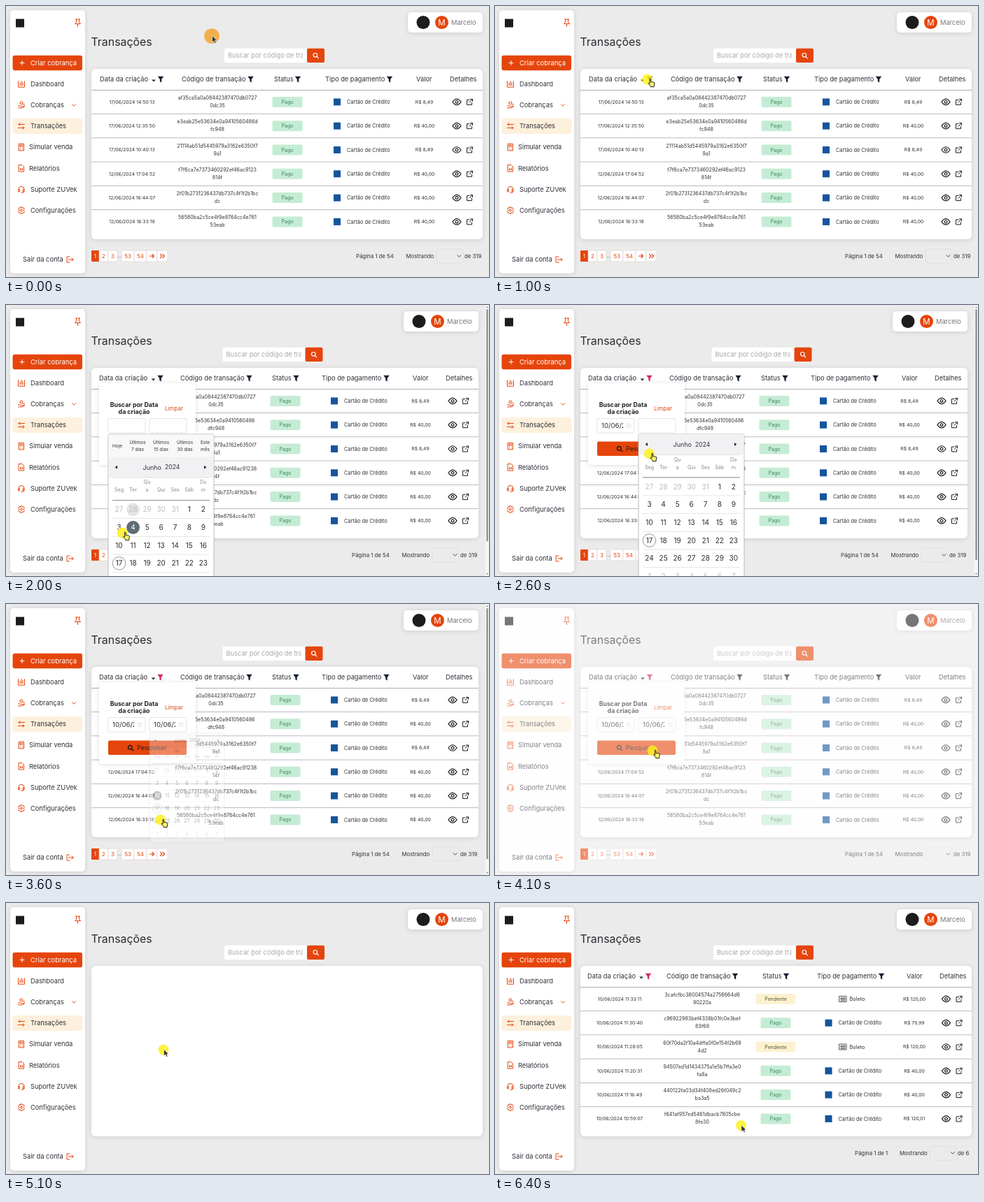
Animation, 690 px wide and 388 px high, one loop 7100 ms. Source, as an HTML page:

```html
<!DOCTYPE html>
<html lang="pt-BR">
<head>
<meta charset="utf-8">
<title>Transações</title>
<style>
html, body { margin: 0; width: 100%; height: 100%; overflow: hidden; background: #ebebeb; }
#stage { display: block; width: 100vw; height: 100vh; }
text { font-family: Inter, "Open Sans", sans-serif; white-space: pre; }
.soft { filter: drop-shadow(0 1px 3px rgba(0, 0, 0, .13)); }
.line { fill: none; stroke-linecap: round; stroke-linejoin: round; }
</style>
</head>
<body>
<svg id="stage" viewBox="0 0 690 388"></svg>
<script>
const ORANGE = '#e5450c', INK = '#30303a', NAVY = '#142030', PINK = '#d32a63';
const LOOP = 7100, STEP = 100;

// drawing helpers
const text = (x, y, s, size, fill = INK, anchor = 'start', weight = 400) =>
  `<text x="${x}" y="${y + size * .36}" font-size="${size}" fill="${fill}" text-anchor="${anchor}" font-weight="${weight}">${s}</text>`;
const mid = (x, y, s, size, fill, weight) => text(x, y, s, size, fill, 'middle', weight);
const rect = (x, y, w, h, fill, r = 0, more = '') =>
  `<rect x="${x}" y="${y}" width="${w}" height="${h}" rx="${r}" fill="${fill}" ${more}/>`;
const circle = (x, y, r, fill, more = '') => `<circle cx="${x}" cy="${y}" r="${r}" fill="${fill}" ${more}/>`;
const line = (x, y, d, color = ORANGE, w = 1) =>
  `<path class="line" transform="translate(${x} ${y})" d="${d}" stroke="${color}" stroke-width="${w}"/>`;
const solid = (x, y, d, fill, more = '') => `<path transform="translate(${x} ${y})" d="${d}" fill="${fill}" ${more}/>`;
const group = (id, body, more = '') => `<g id="${id}" ${more}>${body}</g>`;
const clip = (x, y, w, h, body) => `<svg x="${x}" y="${y}" width="${w}" height="${h}" viewBox="${x} ${y} ${w} ${h}">${body}</svg>`;

const ICON = {
  plus: 'M-3 0H3M0-3V3',
  chart: 'M-4.5-4V4.5H4.5V-4M-2 2V-1M0 2V-4M2 2V-2',
  hand: 'M-4.5 1H-2L0 2H3L4.5 1M-4.5 4H1L4.5 2M-2-3a2 2 0 1 0 4 0a2 2 0 1 0-4 0M2.5-1H4.5',
  swap: 'M4.5-2.5H-4L-2-4.5M-4-2.5L-2-.5M-4.5 2.5H4L2 .5M4 2.5L2 4.5',
  calc: 'M-3.5-4.8H3.5V4.8H-3.5ZM-1.8-3H1.8V-1H-1.8ZM-1.7 1H-1.6M1.6 1H1.7M-1.7 3H-1.6M1.6 3H1.7',
  file: 'M-3.5-4.8H1L3.5-2.2V4.8H-3.5ZM-1.5 2.5V0M0 2.5V1M1.5 2.5V0',
  phones: 'M-4 1V0a4 4 0 0 1 8 0V1M-4 .5H-2.5V3.5H-4ZM2.5 .5H4V3.5H2.5ZM4 3.5Q4 5 0 5',
  gear: 'M-1-4.7H1L1.6-3.2L3.2-3.8L4.4-2L3.4-.8V.8L4.4 2L3.2 3.8L1.6 3.2L1 4.7H-1L-1.6 3.2L-3.2 3.8L-4.4 2L-3.4 .8V-.8L-4.4-2L-3.2-3.8L-1.6-3.2ZM-1.4 0a1.4 1.4 0 1 0 2.8 0a1.4 1.4 0 1 0-2.8 0',
  exit: 'M0-4H-4V4H0M-1.5 0H5M3-2L5 0L3 2',
  pin: 'M-3-5H3M-2-5V-1L-4 1.5H4L2-1V-5M0 1.5V5.5',
  search: 'M-3.5-.7a2.8 2.8 0 1 0 5.6 0a2.8 2.8 0 1 0-5.6 0M1.5 1.5L3.8 3.8',
  eye: 'M-6 0Q0-8.5 6 0Q0 8.5-6 0ZM-1.9 0a1.9 1.9 0 1 0 3.8 0a1.9 1.9 0 1 0-3.8 0',
  open: 'M-.5-3H-4V4H3V.8M1-4H4V-1M4-4L-.5 .5',
  down: 'M-2.5-1.2L0 1.2L2.5-1.2',
  slip: 'M-5-4H5V4H-5ZM-3-2V1M-1.5-2V1M0-2V1M1.5-2V1M3-2V1M-3 2.5H3',
  funnel: 'M-4.2-4.2H4.2L1.2 0V4.4L-1.2 3V0Z',
  arrow: 'M-3 0H3M.5-2.5L3 0L.5 2.5',
  skip: 'M-3-2.5L-.5 0L-3 2.5M.5-2.5L3 0L.5 2.5',
  clock: 'M-3 0a3 3 0 1 0 6 0a3 3 0 1 0-6 0M0-1.5V0H1.2'
};

// sidebar
const MENU = [['chart', 'Dashboard', 35], ['hand', 'Cobranças', 35], ['swap', 'Transações', 35],
  ['calc', 'Simular venda', 33], ['file', 'Relatórios', 33], ['phones', 'Suporte ZUVek', 35], ['gear', 'Configurações', 35]];
const menu = rect(14, 18.5, 12, 12, '#1c1c1c') + line(102.5, 24, ICON.pin) +
  rect(9.5, 70.8, 99.5, 21.5, ORANGE, 3) + line(23, 81.5, ICON.plus, '#fff') + text(35, 81.5, 'Criar cobrança', 9.4, '#fff') +
  rect(9.5, 161, 99.5, 22, '#fdf0dc', 3) +
  MENU.map(([icon, label, x], i) => {
    const y = 111.7 + i * 30.15;
    return line(22, y, ICON[icon]) + text(x, y, label, 9.3);
  }).join('') +
  line(97, 142, ICON.down) + text(24, 363, 'Sair da conta', 9.3) + line(91, 363, ICON.exit);

const heading = text(121.5, 51.6, 'Transações', 15.9, '#2c2c33') + group('search',
  rect(312, 60.7, 119, 20.3, '#fff', 2) + clip(317, 61, 107, 20, text(317, 71, 'Buscar por código de transação', 9.3, '#a8a8ad')) +
  rect(430, 60.7, 25, 20.3, ORANGE, 2) + line(442.5, 71, ICON.search, '#fff', 1.2));

const card = rect(574, 9, 107, 29, '#fff', 5, 'class="soft"') + circle(596, 23.5, 9.5, '#1c1c1c') +
  group('user', circle(622.5, 23.5, 9.5, ORANGE) + mid(622.5, 23.5, 'M', 11.5, '#fff') + text(636, 23.5, 'Marcelo', 9.3, '#77777c'));

// table
const OLD = ['17/06/2024 14:50:13;af35ca5a0a08442387470db0727|0dc35;8,49', '17/06/2024 12:35:50;e3eab25e53634e0a9410560486d|fc948;40,00',
  '17/06/2024 10:40:13;21114ab51d5445979a3162e6350f7|9a1;8,49', '12/06/2024 17:04:52;f7f6ca7e7373460292ef46ac9123|814f;40,00',
  '12/06/2024 16:44:07;2f01b2731236437db737c4f1f2b1bc|dc;40,00', '12/06/2024 16:33:18;56580ba2c5ce4f9e8764cc4e761|53eab;40,00'];
const NARROW = OLD.map(r => r.replace('d|f', '|df').replace('|8', '8|'));
const FOUND = ['10/06/2024 11:33:11;3cafcfbc38004574a2756664d6|90220a;120,00;b', '10/06/2024 11:30:40;c96922983bef4338b01fc0e3bef|83f68;79,99',
  '10/06/2024 11:28:05;60f70da2f10a4dffa0f0e154f2b69|4d2;120,00;b', '10/06/2024 11:20:31;94507ed1d1434375a1e5b7ffa3e0|fa8a;40,00',
  '10/06/2024 11:16:49;440122fa03d34f408ed26f049c2|ba3a5;40,00', '10/06/2024 10:59:07;f641af957ed5461dbacb7805cbe|8fe30;120,01'];
const HEADS = ['Data da criação', 'Código de transação', 'Status', 'Tipo de pagamento', 'Valor', 'Detalhes'];

// heads: label lefts; funnels: icon centres; cols: date, code, status, payment, value, details
const WIDE = { right: 681, heads: [134, 251, 383, 456, 586, 634], funnels: [221, 349.5, 417, 548], cols: [180, 302, 402, 463, 597.5, 644] };
const SLIM = { right: 675, heads: [133, 249, 380, 451, 581, 628], funnels: [220.5, 347.5, 414.5, 543.5], cols: [179, 300, 399, 459, 592, 638] };
const AFTER = { right: 681, heads: [132, 245, 382, 460, 588, 635], funnels: [219, 343, 416, 552], cols: [178, 296, 401, 466.5, 599, 644.5] };

function row(data, i, { cols: c, right }) {
  const [date, code, value, slip] = data.split(';'), [a, b] = code.split('|'), y = 137.4 + i * 34.3;
  const badge = slip ? [57, '#fdf2d0', 'Pendente', '#5c5334'] : [43, '#c4ecd4', 'Pago', '#39875b'];
  return mid(c[0], y, date, 6.8) + mid(c[1], y - 6, a, 7.1) + mid(c[1], y + 5, b, 7.1) +
    rect(c[2] - badge[0] / 2, y - 7.5, badge[0], 15, badge[1], 2) + mid(c[2], y, badge[2], 7, badge[3]) +
    (slip ? line(c[3] + 30.5, y, ICON.slip, '#444', .9) + text(c[3] + 40, y, 'Boleto', 7.3)
      : rect(c[3] + 5, y - 5, 10, 10, '#15559c') + text(c[3] + 24, y, 'Cartão de Crédito', 7.35)) +
    mid(c[4], y, 'R$ ' + value, 6.8) + line(c[5], y, ICON.eye, '#1d1d22', 1.2) + line(c[5] + 18.5, y, ICON.open, '#1d1d22', 1) +
    (i < 5 ? rect(122, y + 16.7, right - 122, .8, '#aaa') : '');
}

const table = (id, lay, rows) => group(id, HEADS.map((h, i) => text(lay.heads[i], 105, h, 9.3)).join('') +
  lay.funnels.map((x, i) => solid(x, 105, ICON.funnel, NAVY, i ? '' : 'class="dated"')).join('') +
  solid(lay.funnels[0] - 10, 107, 'M-2.8-1.4H2.8L0 1.6Z', '#222') +
  rect(122, 120, lay.right - 122, .8, '#999') + rows.map((r, i) => row(r, i, lay)).join(''));

const PAGES = [['2', 133, 13], ['3', 146, 13], ['53', 165, 18], ['54', 183, 18], ['arrow', 201, 15], ['skip', 216, 15]];
const pager = rect(122, 350, 11.5, 16, ORANGE, 1) + mid(127.5, 358, '1', 8, '#fff') +
  PAGES.map(([s, x, w]) => rect(x, 350, w, 16, '#fff', 1, 'stroke="#e0d3cc" stroke-width=".7"') +
    (ICON[s] ? line(x + w / 2, 358, ICON[s], ORANGE, 1.2) : mid(x + w / 2, 358, s, 8, ORANGE))).join('') + mid(162, 357, '...', 7);
const footer = (id, x, pages, total, at, box, end) => group(id, text(x, 358, 'Página 1 de ' + pages, 7.8) + text(at, 358, 'Mostrando', 7.8) +
  rect(box, 348, 38, 20, 'none', 2, 'stroke="#dedede" stroke-width=".8"') + line(box + 32.5, 358, ICON.down, '#444') + text(end, 358, 'de ' + total, 7.8));

// date filter
const field = (x, id) => rect(x, 162.5, 53, 20.5, '#fff', 2, 'stroke="#ddd" stroke-width=".8"') +
  group(id, clip(x + 6, 163, 31, 20, text(x + 6, 172.7, '10/06/2024', 9.6)) + line(x + 45, 172.7, ICON.clock, '#d5d5d5', .7));
const filter = rect(133, 112, 138, 117, '#fff', 4, 'class="soft"') +
  mid(183, 142.5, 'Buscar por Data', 8.8, '#222', 700) + mid(183, 153, 'da criação', 8.8, '#222', 700) +
  text(227, 148, 'Limpar', 8, '#d9480f') + field(146, 'from') + field(205, 'to') +
  rect(146, 195.5, 112, 20.5, ORANGE, 2) + line(178, 206, ICON.search, '#2a1a14', 1.5) + text(187, 206, 'Pesquisar', 9.1, '#2a1a14');

// calendar body, relative to its top left corner
const dayAt = n => [15.5 + n % 7 * 20.05, 75 + Math.floor(n / 7) * 25.7];
const ball = (id, n, label, fill, ink) => group(id, circle(...dayAt(n), 9.4, fill) + mid(...dayAt(n), label, 10, ink));
function month() {
  const days = Array.from({ length: 42 }, (_, n) => {
    const out = n < 5 || n > 34, d = n < 5 ? 27 + n : n > 34 ? n - 34 : n - 4;
    return mid(...dayAt(n), d, 10, out ? '#bdbdbd' : '#2c2c30');
  }).join('');
  const rules = Array.from({ length: 5 }, (_, i) => rect(6, 87.6 + i * 25.7, 139, .6, '#d4d4d4')).join('');
  const names = ['Seg', 'Ter', 'Qu a', 'Qui', 'Sex', 'Sáb', 'Do m'].map((s, i) => {
    const [a, b] = s.split(' '), x = 15.5 + i * 20.05;
    return b ? mid(x, 36, a, 7.2, '#888') + mid(x, 47, b, 7.2, '#888') : mid(x, 47, a, 7.2, '#888');
  }).join('');
  return rect(.5, 0, 150, 29, '#f1f1f3') + text(49.5, 14.5, 'Junho', 9) + text(81, 14.5, '2024', 8.6) +
    solid(11.5, 14.5, 'M1.5-2.5V2.5L-1.8 0Z', '#222') + solid(138.5, 14.5, 'M-1.5-2.5V2.5L1.8 0Z', '#222') +
    rect(6, 29, 139, .6, '#ccc') + names + rect(6, 61.5, 139, .9, '#777') + rules + days +
    circle(...dayAt(21), 9.3, 'none', 'stroke="#888" stroke-width=".9"');
}
const PRESETS = [['Hoje', 13], ['Últimos|7 dias', 42], ['Últimos|15 dias', 75.5], ['Últimos|30 dias', 109.5], ['Este|mês', 138.5]];
const CAL_TOP = 185, TO_HEIGHT = 221, PRESET_HEIGHT = 32.8, FROM_HEIGHT = TO_HEIGHT + PRESET_HEIGHT;
const panel = h => rect(0, 0, 151, h, '#fff', 1, 'stroke="#aaa" stroke-width=".8"');
const calFrom = panel(FROM_HEIGHT) + rect(.5, .5, 150, PRESET_HEIGHT, '#f8f8f9') + PRESETS.map(([s, x]) => {
  const [a, b] = s.split('|');
  return b ? mid(x, 12, a, 6.5) + mid(x, 21.5, b, 6.5) : mid(x, 17, a, 6.5);
}).join('') + `<g transform="translate(0 ${PRESET_HEIGHT})">${month()}${ball('trail', 1, 28, '#e4e4e4', '#bdbdbd')}${ball('hover', 8, 4, '#5e6c73', '#fff')}${ball('pickFrom', 14, 10, '#5e6c73', '#fff')}</g>`;
const calTo = panel(TO_HEIGHT) + month() + ball('pickTo', 14, 10, '#5c5f63', '#fff');

const pointer = circle(0, 0, 7.5, '#fff01f', 'id="dot" fill-opacity=".85"') +
  group('arrow', solid(0, 0, 'M.5-.5V9L2.8 7L4.4 10.4L6 9.6L4.5 6.4H7.3Z', '#333', 'stroke="#fff" stroke-width=".6"')) +
  group('finger', solid(2.2, -.8, 'M1.4 0Q2.8-.3 2.9 1.2V4.3L7.2 5Q8.4 5.3 8.2 6.8L7.5 10V11.5H2.5V10.3L-.4 7.3Q-.8 6 .5 6.2L1.4 7Z', '#fff36a', 'stroke="#222" stroke-width="1"'));

const $ = id => document.getElementById(id);
$('stage').innerHTML = rect(0, 0, 690, 388, '#ebebeb') + rect(6, 6, 107, 377, '#fff', 5, 'class="soft"') +
  group('menu', menu) +
  group('main', heading + rect(122, 90, 559, 244, '#fff', 6, 'id="sheet" class="soft"')) + group('card', card) +
  table('wide', WIDE, OLD) + table('slim', SLIM, NARROW) + table('after', AFTER, FOUND) +
  group('pager', pager) + footer('footOld', 500, 54, 319, 571.5, 615, 655) + footer('footNew', 514, 1, 6, 578, 621.5, 661) +
  group('filter', filter) + group('calFrom', calFrom) + group('calTo', calTo) +
  group('bar', rect(685, 0, 5, 388, '#f6f6f6') + rect(686.3, 6, 2.4, 352, '#8f8f8f', 1, 'id="thumb"') +
    solid(687.5, 3, 'M-1.5 1H1.5L0-1Z', '#888') + solid(687.5, 385, 'M-1.5-1H1.5L0 1Z', '#888')) +
  rect(0, 0, 690, 388, '#fdfdfd', 0, 'id="veil"') + group('pointer', pointer);

// time, x, y
const PATH = [[0, 294, 43], [900, 217.5, 105], [1100, 217.5, 105], [1500, 172, 172], [1600, 172, 174], [2000, 166, 326], [2100, 161, 342],
  [2400, 227, 174], [2600, 220.5, 213], [3200, 220.5, 309], [3600, 220.5, 309], [3900, 225, 210], [5400, 225, 210], [5900, 351.5, 318.5], [LOOP, 351.5, 318.5]];
// time, opacity
const VEIL = [[0, 0], [4000, 0], [4100, .4], [4200, .85], [4300, 1], [4400, .7], [4600, 0], [LOOP, 0]];
const FADE_FROM = [[0, 0], [1400, 0], [1500, 1], [2100, 1], [2200, .35], [2300, 0], [LOOP, 0]];
const FADE_TO = [[0, 0], [2300, 0], [2400, .6], [2500, 1], [3500, 1], [3600, .35], [3700, 0], [LOOP, 0]];

function at(keys, t, ease = p => p) {
  const i = Math.max(1, keys.findIndex(k => k[0] >= t)), a = keys[i - 1], b = keys[i];
  const p = ease((t - a[0]) / (b[0] - a[0]));
  return a.slice(1).map((v, j) => v + (b[j + 1] - v) * p);
}
const smooth = p => p * p * (3 - 2 * p);
const show = (id, on) => { $(id).style.display = on ? '' : 'none'; };
const move = (id, x, y, s = 1) => $(id).setAttribute('transform', `translate(${x} ${y}) scale(${s})`);

function calendar(id, x, opacity, closing) {
  show(id, opacity > 0);
  $(id).setAttribute('opacity', opacity);
  move(id, x, CAL_TOP, closing ? .55 + .45 * opacity : 1);
}

function draw(t) {
  const loaded = t >= 4300, slim = t >= 1500 && t < 3700, done = t >= 5500;
  show('menu', !loaded || t >= 4800);
  show('main', !loaded || t >= 4900);
  show('card', !loaded || t >= 4800);
  show('user', !loaded || t >= 5100);
  show('wide', !loaded && !slim);
  show('slim', slim);
  show('bar', slim);
  show('pager', !loaded);
  show('footOld', !loaded);
  show('after', done);
  show('footNew', done);
  move('card', slim ? -6 : 0, 0);
  move('footOld', slim ? -6 : 0, 0);
  move('search', slim ? -2.5 : 0, 0);
  $('sheet').setAttribute('width', slim ? 553 : 559);
  // the thumb shrinks as the open calendar makes the page taller
  const pageHeight = CAL_TOP + (t < 2300 ? FROM_HEIGHT : TO_HEIGHT);
  $('thumb').setAttribute('height', 376 * 388 / pageHeight);

  show('filter', t >= 1100 && !loaded);
  show('from', t >= 2200);
  show('to', t >= 3300);
  document.querySelectorAll('.dated').forEach(e => e.setAttribute('fill', t >= 2200 ? PINK : NAVY));
  show('trail', t >= 1900 && t < 2100);
  show('hover', t >= 1900 && t < 2100);
  show('pickFrom', t >= 2100);
  show('pickTo', t >= 3200);
  calendar('calFrom', 146, at(FADE_FROM, t)[0], t > 2100);
  calendar('calTo', 205, at(FADE_TO, t)[0], t > 3500);
  $('veil').setAttribute('opacity', at(VEIL, t)[0]);

  const hand = t >= 800 && t < 1200 || t >= 1800 && t < 2200 || t >= 2500 && t < 4200, press = t < 100;
  move('pointer', ...at(PATH, t, smooth));
  show('arrow', !hand);
  show('finger', hand);
  $('dot').setAttribute('r', press ? 10.8 : 7.5);
  $('dot').setAttribute('fill', press ? '#f4a52e' : '#fff01f');
}

const start = performance.now();
function tick() {
  const t = (performance.now() - start) % LOOP;
  draw(Math.floor(t / STEP) * STEP);
  requestAnimationFrame(tick);
}
tick();
</script>
</body>
</html>
```
